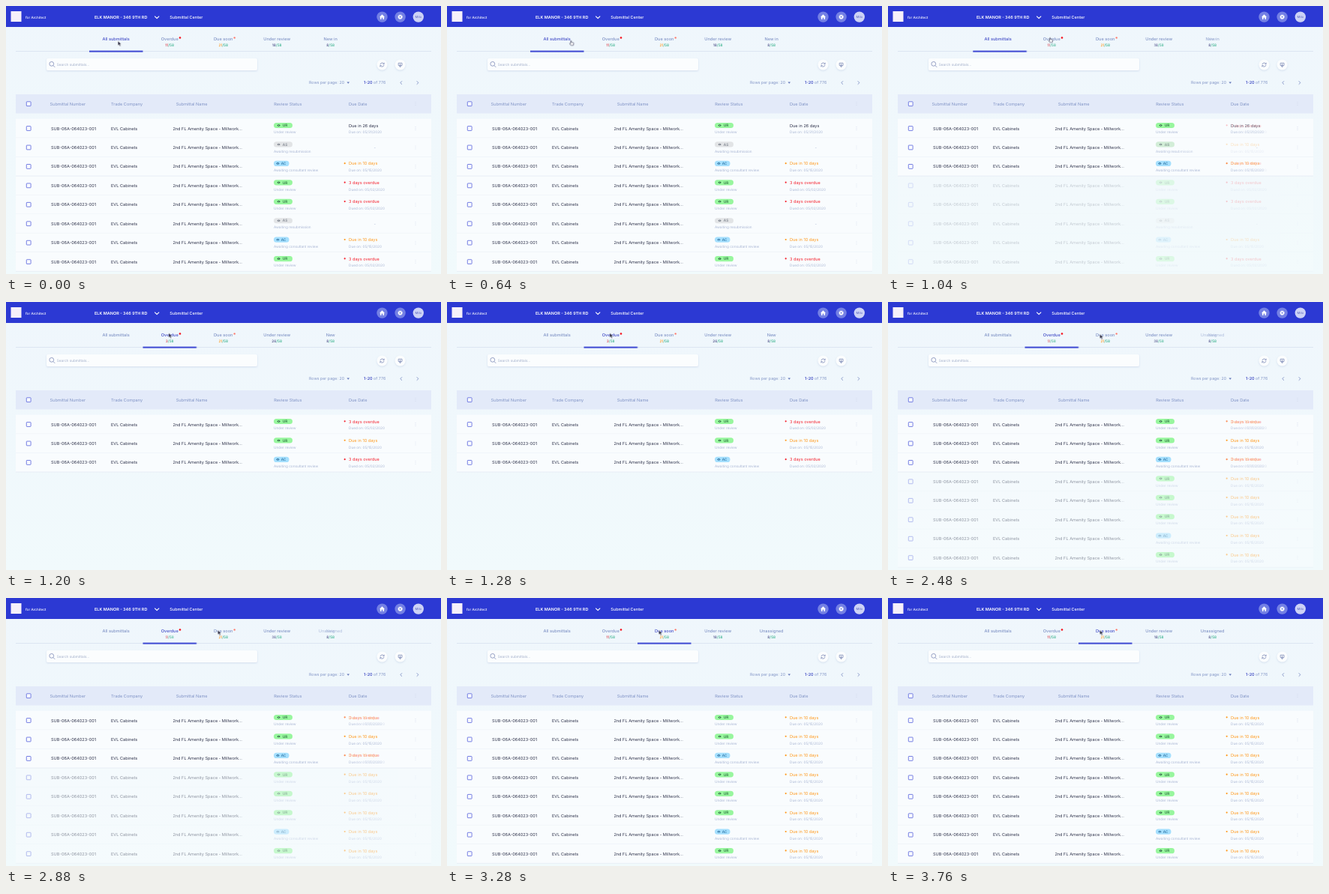
Recreate the animation shown at these times as an HTML page. Size 580 by 358 pixels, loop 3840 ms.

```html
<!DOCTYPE html>
<html lang="en">
<head>
<meta charset="utf-8">
<title>Submittal Center</title>
<style>
html, body { margin: 0; width: 100%; height: 100%; overflow: hidden; background: #f1f9fc; }
svg { display: block; width: 580px; height: 358px; font-family: Inter, Roboto, sans-serif; text-rendering: geometricPrecision; }
.all, .over, .soon, .later, .lower, .lowerAll, .tab0, .tab1, .tab2, #bar, #pointer, #arrow, #hand, #ghost {
  animation: 3840ms linear infinite;
}
.all { animation-name: all; }
.over { animation-name: over; }
.soon { animation-name: soon; }
.later { animation-name: later; }
.lower { animation-name: lower; }
.lowerAll { animation-name: lowerAll; }
.tab0 { animation-name: tab0; }
.tab1 { animation-name: tab1; }
.tab2 { animation-name: tab2; }
#bar { animation-name: bar; animation-timing-function: ease-in-out; }
#pointer { animation-name: pointer; animation-timing-function: cubic-bezier(.37, 0, .63, 1); }
#arrow { animation-name: arrow; animation-timing-function: step-end; }
#hand { animation-name: hand; animation-timing-function: step-end; }
#ghost { animation-name: ghost; animation-timing-function: step-end; }

@keyframes all { 0%, 26% { opacity: 1 } 30.2%, 100% { opacity: 0 } }
@keyframes over { 0%, 26% { opacity: 0 } 30.2%, 60.7% { opacity: 1 } 64.6%, 75% { opacity: .5 } 79.2%, 100% { opacity: 0 } }
@keyframes soon { 0%, 60.7% { opacity: 0 } 64.6%, 75% { opacity: .5 } 79.2%, 100% { opacity: 1 } }
@keyframes later { 0%, 26% { opacity: 0 } 30.2%, 100% { opacity: 1 } }
@keyframes lower { 0%, 22.9% { opacity: 1 } 28.4%, 60.7% { opacity: 0 } 64.6%, 75% { opacity: .5 } 79.2%, 100% { opacity: 1 } }
@keyframes lowerAll { 0%, 22.9% { opacity: 1 } 28.4%, 100% { opacity: 0 } }
@keyframes tab0 { 0%, 28% { fill: #4650c8 } 31%, 100% { fill: #8094c6 } }
@keyframes tab1 { 0%, 28% { fill: #8094c6 } 31%, 75% { fill: #4650c8 } 79.2%, 100% { fill: #8094c6 } }
@keyframes tab2 { 0%, 75% { fill: #8094c6 } 79.2%, 100% { fill: #4650c8 } }
@keyframes bar {
  0%, 26.5% { transform: translateX(0) }
  31.3%, 75% { transform: translateX(71.5px) }
  79.2%, 100% { transform: translateX(143px) }
}
@keyframes pointer {
  0%, 12.5% { transform: translate(149.3px, 46.8px) }
  25%, 42.7% { transform: translate(217px, 41.5px) }
  55.7%, 100% { transform: translate(282.5px, 43px) }
}
@keyframes arrow { 0% { opacity: 1 } 13% { opacity: 0 } 29.5% { opacity: 1 } 42.7% { opacity: 0 } 58% { opacity: 1 } }
@keyframes hand { 0% { opacity: 0 } 13% { opacity: 1 } 29.5% { opacity: 0 } 42.7% { opacity: 1 } 58% { opacity: 0 } }
@keyframes ghost { 0% { opacity: 0 } 42.7% { opacity: 1 } 60.7% { opacity: 0 } }
</style>
</head>
<body>
<svg id="stage" viewBox="0 0 580 358">
  <defs>
    <linearGradient id="page" x2="0" y2="1">
      <stop stop-color="#eff6fc"/><stop offset="1" stop-color="#f1fafc"/>
    </linearGradient>
    <filter id="soft" x="-20%" y="-40%" width="140%" height="200%">
      <feDropShadow dx="0" dy="1" stdDeviation="1" flood-color="#8fa5cc" flood-opacity=".3"/>
    </filter>
    <path id="tip" d="M0 0V6L1.5 4.7L2.5 6.9L3.6 6.4L2.6 4.3H4.4Z" fill="#23243a" stroke="#fff" stroke-width=".45"/>
    <g id="eye">
      <path d="M-2.1 0Q0-2.6 2.1 0Q0 2.6-2.1 0Z"/>
      <circle r=".5" fill="#fff"/>
    </g>
  </defs>
  <rect width="580" height="358" fill="url(#page)"/>
  <rect width="580" height="28" fill="#2c39d3"/>
  <rect x="6.5" y="7" width="14" height="14" fill="#f6f0fa"/>
  <path d="M198.2 13.6L201.2 16.4L204.2 13.6" fill="none" stroke="#fff" stroke-width="1.1"/>
  <g fill="#7480e4">
    <circle cx="501.5" cy="14.6" r="7.2"/><circle cx="525.6" cy="14.6" r="7.2"/>
    <circle cx="549.8" cy="14.6" r="7.2" fill="#cdd2f6"/>
  </g>
  <path d="M498 14.7L501.5 11.3L505 14.7H504.1V17.7H502.4V15.6H500.6V17.7H498.9V14.7Z" fill="#fff"/>
  <circle cx="525.6" cy="14.6" r="1.9" fill="none" stroke="#fff" stroke-width="1.5"/>
  <circle cx="525.6" cy="14.6" r="2.9" fill="none" stroke="#fff" stroke-width=".8" stroke-dasharray="1.14"/>

  <path d="M13 60.5H567" stroke="#dbe4f1" stroke-width=".9"/>
  <rect id="bar" x="111" y="59.6" width="71.5" height="2" fill="#3d48d2"/>
  <circle cx="232" cy="42.4" r="1.3" fill="#f5222d"/>
  <circle cx="304.7" cy="42.4" r="1.2" fill="#ff7d70"/>

  <g fill="#fbfdfe" filter="url(#soft)">
    <rect x="54" y="70" width="281" height="16" rx="2"/>
    <circle cx="501.5" cy="78.5" r="7"/><circle cx="525.6" cy="78.5" r="7"/>
  </g>
  <g fill="none" stroke="#7f8cb8" stroke-width=".8">
    <circle cx="60.8" cy="77.3" r="2.9"/><path d="M63 79.5L65.2 81.8"/>
    <path d="M499 78.2A2.6 2.6 0 0 1 503.8 77.2M504 78.8A2.6 2.6 0 0 1 499.2 79.8M504.2 75.7V77.5H502.4M498.8 81.3V79.5H500.6"/>
    <path d="M523.2 76.2H528V79.4H523.2ZM525.6 77.2V81.4M524.2 80.2L525.6 81.6L527 80.2"/>
    <path d="M528 100.3L525.8 102.5L528 104.7M547.7 100.3L549.9 102.5L547.7 104.7" stroke="#7083bd"/>
  </g>
  <path d="M454.5 101.5H458L456.25 103.7Z" fill="#5f74b8"/>
  <rect x="13" y="118" width="554" height="25.5" fill="#e3eaf9"/>
  <g id="rows"></g>
  <g id="labels"></g>
  <use id="ghost" href="#tip" x="217" y="41.5"/>
  <g id="pointer">
    <use id="arrow" href="#tip"/>
    <path id="hand" d="M-1.4 4.6V1.1Q-.9 .3-.4 1.1V3L2.2 3.5Q2.8 3.7 2.7 4.5L2.2 7H-1.2L-2.9 4.8Q-2.6 3.8-1.4 4.6Z" fill="#fff" stroke="#3a3c58" stroke-width=".65"/>
  </g>
</svg>
<script>
const NS = 'http://www.w3.org/2000/svg';
const INK = '#30344c', PALE = '#a9b6d4', BLUE = '#8094c6', GREEN = '#2fae87';
const RED = '#f5232f', ORANGE = '#ff9a1f';
const rows = document.getElementById('rows'), labels = document.getElementById('labels');

function add(parent, tag, attrs = {}, content = '') {
  const el = document.createElementNS(NS, tag);
  for (const key in attrs) el.setAttribute(key, attrs[key]);
  el.textContent = content;
  return parent.appendChild(el);
}
// Text placed by its vertical centre
function text(parent, str, x, y, fill = INK, size = 5.6, extra = {}) {
  return add(parent, 'text', { x, y: y + size * .36, fill, 'font-size': size, ...extra }, str);
}
const group = (parent, cls) => add(parent, 'g', { class: cls });
const rowY = i => 163.5 + 25.45 * i;
const middle = { 'text-anchor': 'middle', 'font-weight': 500 };

function checkbox(parent, y) {
  add(parent, 'rect', { x: 27.3, y: y - 2.9, width: 5.8, height: 5.8, rx: .6, fill: '#fafcff', stroke: '#5560dc', 'stroke-width': .8 });
}
function dots(parent, y) {
  for (const d of [-2, 0, 2]) add(parent, 'circle', { cx: 546, cy: y + d, r: .4, fill: '#bac5de' });
}

const STATUS = {
  UR: ['#98f69e', 25, 'Under review', '#24683a'],
  AS: ['#e2e4e6', 25, 'Awaiting resubmission', '#777d88'],
  AC: ['#a5dffd', 20.5, 'Awaiting consultant review', '#2873a6']
};
function status(parent, i, code) {
  const [color, width, note, ink] = STATUS[code], y = rowY(i) - 4;
  add(parent, 'rect', { x: 357, y: y - 3.6, width, height: 7.2, rx: 3.6, fill: color });
  add(parent, 'use', { href: '#eye', x: width > 21 ? 363.6 : 362.4, y, fill: ink });
  text(parent, code, width > 21 ? 372 : 370, y, ink, 4.8, middle);
  text(parent, note, 357, y + 9, PALE, 4.7);
}

const DUE = {
  26: ['Due in 26 days', 'Due on: 05/31/2020', INK],
  10: ['Due in 10 days', 'Due on: 05/15/2020', ORANGE],
  3: ['3 days overdue', 'Dued on: 05/02/2020', RED]
};
function due(parent, i, days) {
  const y = rowY(i) - 4;
  if (!days) return text(parent, '-', 490.5, y + 4, PALE);
  const [title, note, color] = DUE[days];
  if (days !== 26) add(parent, 'circle', { cx: 451.7, cy: y - .2, r: 1.1, fill: color });
  text(parent, title, 457, y, color);
  text(parent, note, 457, y + 9, PALE, 4.7);
}

function base(parent, i) {
  const y = rowY(i);
  add(parent, 'rect', { x: 13, y: y - 12.8, width: 554, height: 25.5, fill: '#f9fcfe' });
  add(parent, 'path', { d: `M13 ${y + 12.7}H567`, stroke: '#e5ebf4', 'stroke-width': .8 });
  checkbox(parent, y);
  text(parent, 'SUB-06A-064023-001', 60, y);
  text(parent, 'EVL Cabinets', 140, y);
  text(parent, '2nd FL Amenity Space - Millwork...', 222.4, y);
  dots(parent, y);
}

// Lower rows fade as a whole
const lower = group(rows, 'lower');
for (let i = 0; i < 8; i++) base(i < 3 ? rows : lower, i);
const lowerAll = group(rows, 'lowerAll'), lowerSoon = group(rows, 'soon');
['UR', 'UR', 'AS', 'AC', 'UR'].forEach((code, n) => {
  status(lowerAll, n + 3, code);
  due(lowerAll, n + 3, [3, 3, 0, 10, 3][n]);
});
['UR', 'UR', 'UR', 'AC', 'UR'].forEach((code, n) => {
  status(lowerSoon, n + 3, code);
  due(lowerSoon, n + 3, 10);
});

// Top rows stay and cross-fade only where they differ
const topAll = group(rows, 'all'), topOver = group(rows, 'over');
const topSoon = group(rows, 'soon'), later = group(rows, 'later');
status(rows, 0, 'UR');
status(rows, 2, 'AC');
status(topAll, 1, 'AS');
status(later, 1, 'UR');
[26, 0, 10].forEach((days, i) => due(topAll, i, days));
due(later, 1, 10);
for (const i of [0, 2]) {
  due(topOver, i, 3);
  due(topSoon, i, 10);
}

// Header bar
text(labels, 'for Architect', 26, 15.3, '#fff', 4.6, { 'font-weight': 500 });
text(labels, 'ELK MANOR - 346 9TH RD', 118, 15, '#fff', 5.5, { 'font-weight': 600 });
text(labels, 'Submittal Center', 218.3, 15, '#fff', 5.5, { 'font-weight': 500 });
text(labels, 'Milo', 549.8, 14.6, '#6670c4', 4.2, middle);

// Tabs
const tabX = n => 146.7 + 71.5 * n;
function count(parent, n, value, color) {
  const el = text(parent, '', tabX(n), 52.4, GREEN, 4.8, middle);
  add(el, 'tspan', { fill: color }, value);
  add(el, 'tspan', {}, '/58');
}
['All submittals', 'Overdue', 'Due soon', 'Under review'].forEach((name, n) =>
  text(labels, name, tabX(n), 44.3, BLUE, 5.65, { ...middle, class: 'tab' + n }));
count(labels, 2, 21, ORANGE);
count(labels, 4, 8, '#4b4f86');
[['all', 11, 18, 'New in'], ['over', 3, 26, 'New'], ['soon', 11, 18, 'Unassigned']].forEach(([cls, late, review, last]) => {
  const g = group(labels, cls);
  count(g, 1, late, '#d83a45');
  count(g, 3, review, '#4b4f86');
  text(g, last, tabX(4), 44.3, BLUE, 5.6, middle);
});

// Tools and table head
text(labels, 'Search submittals...', 67.8, 78.3, '#a3afcb', 4.7);
text(labels, 'Rows per page: 20', 404, 102.5, BLUE, 5.3);
const range = text(labels, '', 477, 102.5, BLUE, 5.4);
add(range, 'tspan', { fill: '#4652c6', 'font-weight': 600 }, '1-20');
add(range, 'tspan', {}, ' of 776');
checkbox(labels, 130.7);
dots(labels, 130.7);
[['Submittal Number', 58.5], ['Trade Company', 140], ['Submittal Name', 226.7], ['Review Status', 357.2], ['Due Date', 457]]
  .forEach(([name, x]) => text(labels, name, x, 130.7, BLUE));
</script>
</body>
</html>
```
